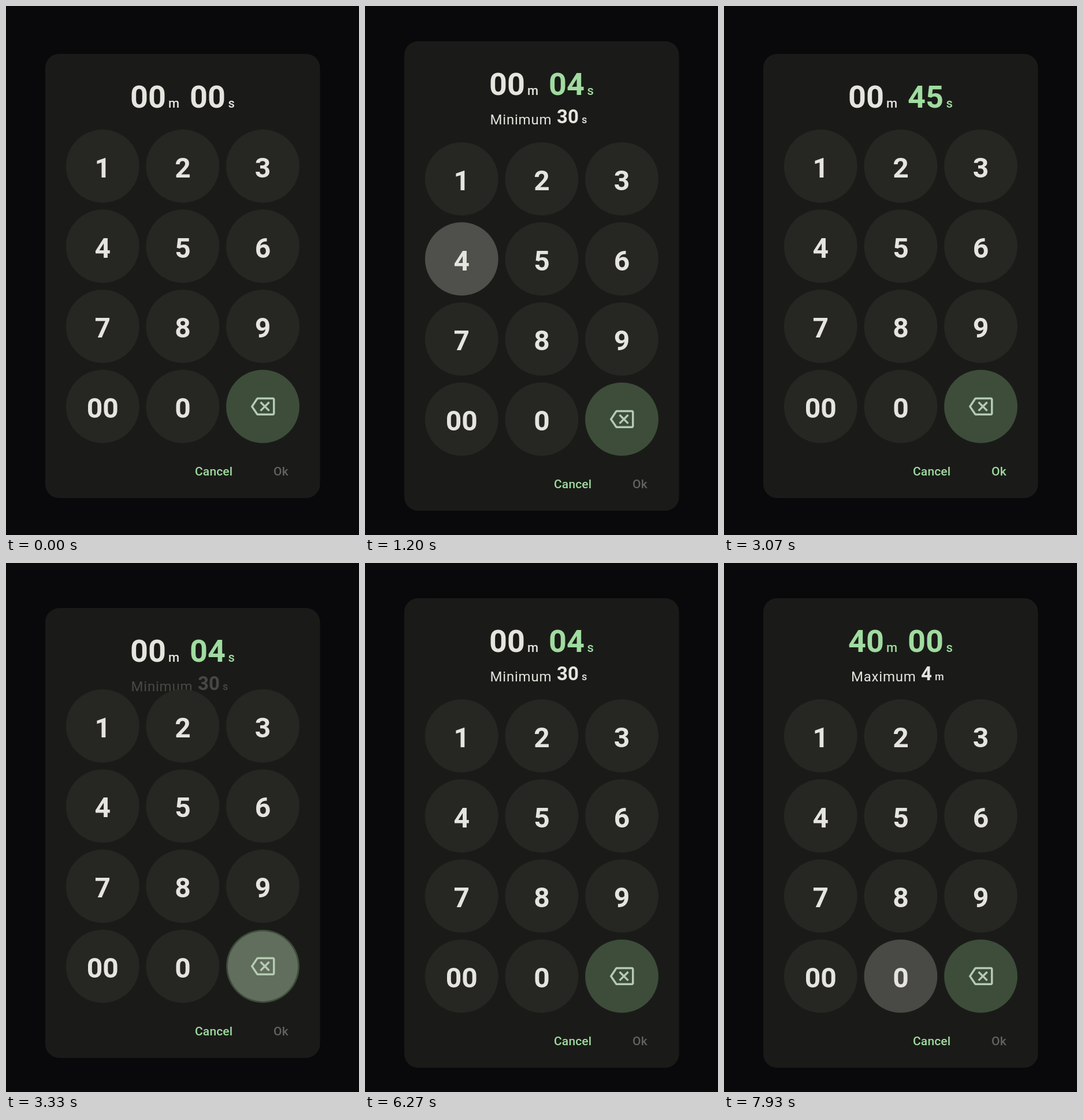
An HTML page for the animation above (8000 ms loop, 611x916 px).

```html
<!DOCTYPE html>
<html>
<head>
<meta charset="utf-8">
<style>
html, body { margin: 0; width: 100%; height: 100%; overflow: hidden; background: #09090b; }
svg { display: block; width: 100vw; height: 100vh; font-family: Roboto, sans-serif; fill: #e5e4de; }
.time { font-size: 54px; font-weight: 700; }
.unit { font-size: 22px; font-weight: 500; }
.hint { font-size: 24px; letter-spacing: .8px; }
.limit { font-size: 33px; font-weight: 700; }
.small { font-size: 18px; font-weight: 500; }
.key { font-size: 48px; font-weight: 700; text-anchor: middle; }
.action { font-size: 21px; font-weight: 500; letter-spacing: .15px; }
</style>
</head>
<body>
<svg viewBox="0 0 611 916">
  <rect id="panel" x="68" width="475.5" rx="24" fill="#1a1b18"/>
  <g id="head">
    <g id="minutes"><text class="time" x="215" y="176"></text><text class="unit" x="281" y="176">m</text></g>
    <g id="seconds"><text class="time" x="318" y="176"></text><text class="unit" x="384.5" y="176">s</text></g>
    <g id="min">
      <text class="hint" x="216.5" y="227">Minimum</text>
      <text class="limit" x="332" y="225">30</text>
      <text class="small" x="375" y="225">s</text>
    </g>
    <g id="max">
      <text class="hint" x="220" y="227">Maximum</text>
      <text class="limit" x="341" y="225">4</text>
      <text class="small" x="365" y="225">m</text>
    </g>
  </g>
  <g id="body">
    <g id="keys"></g>
    <text class="action" x="327" y="813" fill="#a0dba0">Cancel</text>
    <text class="action" x="463" y="813" id="ok">Ok</text>
  </g>
</svg>
<script>
const $ = id => document.getElementById(id);
const GREEN = '#a0dba0', WHITE = '#e5e4de', GRAY = '#62635f';
const LOOP = 8000, SHIFT = 22, DELAY = 130, RESIZE = 200, R = 63.4;
const DEL = 11;
const labels = ['1', '2', '3', '4', '5', '6', '7', '8', '9', '00', '0'];
const backspace = 'M22 3H7c-.69 0-1.23.35-1.59.88L0 12l5.41 8.11c.36.53.9.89 1.59.89h15c1.1 0 2-.9 2-2V5c0-1.1-.9-2-2-2z' +
  'm0 16H7.07L2.4 12l4.66-7H22v14zm-11.59-2L14 13.41 17.59 17 19 15.59 15.41 12 19 8.41 17.59 7 14 10.59 10.41 7 9 8.41 12.59 12 9 15.59z';

// Each press: start time, key index, resulting digits, hint shown afterwards
const presses = [
  { at: 730, key: 3, value: '0004', hint: 'min' },
  { at: 1200, key: 4, value: '0045' },
  { at: 3140, key: DEL, value: '0004', hint: 'min' },
  { at: 6340, key: 9, value: '0400' },
  { at: 7400, key: 10, value: '4000', hint: 'max' }
];

let markup = '';
for (let i = 0; i < 12; i++) {
  const x = 167.3 + i % 3 * 138.6, y = 277.3 + Math.floor(i / 3) * 138.7;
  const face = i === DEL
    ? `<path d="${backspace}" fill="#b5ccb3" transform="translate(-20.8 -20.9) scale(1.74)"/>`
    : `<text class="key" y="19.5">${labels[i]}</text>`;
  markup += `<g transform="translate(${x} ${y})"><circle r="${R}" fill="${i === DEL ? '#3d4d3a' : '#262723'}"/>` +
    `<circle class="ripple" opacity="0"/>${face}</g>`;
}
$('keys').innerHTML = markup;
const ripples = document.querySelectorAll('.ripple');

const clamp = v => Math.min(1, Math.max(0, v));
const ease = v => v * v * (3 - 2 * v);

function setPart(id, digits, color) {
  $(id).firstChild.textContent = digits;
  $(id).setAttribute('fill', color);
}

function draw(t) {
  let value = '0000', hint, shownHint, open = 0;
  ripples.forEach(r => r.setAttribute('opacity', 0));
  for (const p of presses) {
    const age = t - p.at;
    if (age < 0) break;
    const alpha = .21 * clamp(age / 75) * (1 - clamp((age - 500) / 230));
    ripples[p.key].setAttribute('r', R * (.3 + .7 * ease(clamp(age / 225))));
    ripples[p.key].setAttribute('opacity', alpha);
    if (age < DELAY) continue;
    value = p.value;
    hint = p.hint;
    shownHint = hint || shownHint;
    const k = ease(clamp((age - DELAY) / RESIZE));
    open = hint ? k : 1 - k;
  }

  const shift = SHIFT * open;
  $('panel').setAttribute('y', 83 - shift);
  $('panel').setAttribute('height', 769 + 2 * shift);
  $('head').setAttribute('transform', `translate(0 ${-shift})`);
  $('body').setAttribute('transform', `translate(0 ${shift})`);
  for (const id of ['min', 'max']) $(id).setAttribute('opacity', id === shownHint ? open : 0);

  const mm = value.slice(0, 2), ss = value.slice(2);
  setPart('minutes', mm, mm > 0 ? GREEN : WHITE);
  setPart('seconds', ss, value > 0 ? GREEN : WHITE);
  $('ok').setAttribute('fill', value > 0 && !hint ? GREEN : GRAY);
}

const start = performance.now();
function frame() {
  draw((performance.now() - start) % LOOP);
  requestAnimationFrame(frame);
}
frame();
</script>
</body>
</html>
```
